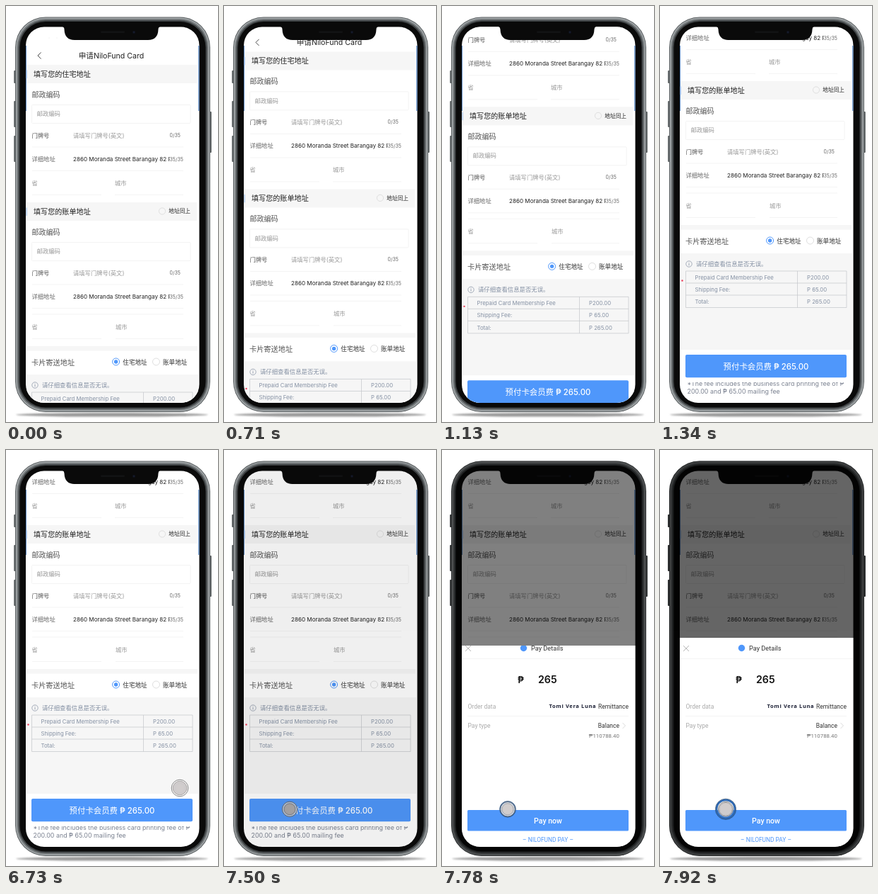
An HTML page that plays this animation: 300x587 px, repeating every 7.99 s.

```html
<!DOCTYPE html>
<html lang="zh-CN">
<head>
<meta charset="utf-8">
<style>
  html, body { margin: 0; width: 100%; height: 100%; overflow: hidden; background: #fff; }
  svg { display: block; width: 100%; height: 100%; }
  text { font-family: Inter, "Noto Sans CJK SC", "Noto Sans CJK", sans-serif; white-space: pre; }
  .roboto { font-family: Roboto, Inter, sans-serif; }
  .wide { font-family: "Open Sans", sans-serif; letter-spacing: .6px; }
</style>
</head>
<body>
<svg id="stage" viewBox="0 0 300 587"></svg>
<script>
const LOOP = 7990, STEP = 70, SCROLL = 171;
const BLUE = '#4f97fb', GREY = '#f6f6f6', LINE = '#f0f0f0', SLATE = '#8490a3';

// Text is placed by its vertical centre.
function label(x, y, size, fill, string, { anchor = 'start', weight = 400, font = '' } = {}) {
  return `<text x="${x}" y="${y + size * .37}" font-size="${size}" fill="${fill}" ` +
    `text-anchor="${anchor}" font-weight="${weight}" class="${font}">${string}</text>`;
}
const box = (x1, y1, x2, y2, fill, extra = '') =>
  `<rect x="${x1}" y="${y1}" width="${x2 - x1}" height="${y2 - y1}" fill="${fill}" ${extra}/>`;
const stroke = (d, color, width = .7) =>
  `<path d="${d}" fill="none" stroke="${color}" stroke-width="${width}"/>`;
const rule = (x1, x2, y) => stroke(`M${x1} ${y}H${x2}`, LINE);
const ring = (x, y, r, color, width = .7) =>
  `<circle cx="${x}" cy="${y}" r="${r}" fill="none" stroke="${color}" stroke-width="${width}"/>`;
const dot = (x, y, r, fill) => `<circle cx="${x}" cy="${y}" r="${r}" fill="${fill}"/>`;

// One layer of the phone's rim, inset from its outer edge.
const rim = (inset, fill) =>
  box(13 + inset, 15.5 + inset, 289 - inset, 573 - inset, fill, `rx="${43 - inset}"`);

function addressForm(top, title, cityY, cityX) {
  return box(29, top - 13, 270, top + 13, GREY) +
    box(28.5, top - 5.5, 29.8, top + 6, '#a9c8f0') +
    label(39, top, 10.1, '#222', title, { weight: 500 }) +
    label(36.5, top + 29, 10, '#555', '邮政编码') +
    box(36.5, top + 43.5, 261, top + 69.5, '#fff', `stroke="${LINE}" stroke-width=".8" rx="1"`) +
    label(43.5, top + 56, 8.4, '#999', '邮政编码') +
    label(36.5, top + 86.5, 8.3, '#555', '门牌号') +
    label(95, top + 86.5, 8.3, '#999', '请填写门牌号(英文)') +
    label(231.5, top + 86.5, 7, '#666', '0/35') +
    rule(37, 251, top + 103) +
    label(36.5, top + 120, 8.3, '#666', '详细地址') +
    `<g clip-path="url(#field)">` +
    label(95, top + 120, 8.1, '#222', '2860 Moranda Street Barangay 82 F') + `</g>` +
    label(231.5, top + 120, 7, '#666', '35/35') +
    rule(37, 251, top + 136.5) +
    label(36.5, cityY, 8.3, '#999', '省') +
    label(cityX, cityY, 8.3, '#999', '城市') +
    rule(37, 135, cityY + 16.5) + rule(cityX, 251, cityY + 16.5);
}

function feeTable() {
  const rows = [['Prepaid Card Membership Fee', 'P200.00'], ['Shipping Fee:', 'P 65.00'], ['Total:', 'P 265.00']];
  return stroke('M36.5 545H264V596.5H36.5ZM36.5 562H264M36.5 579H264M194.5 545V596.5', '#c3c6cb') +
    rows.map(([name, price], i) => {
      const y = 553.7 + i * 17.3;
      return label(49.5, y, 7.75, SLATE, name) + label(208, y, 7.75, SLATE, price);
    }).join('');
}

const page =
  dot(61, 45, .5, '#ddd') + dot(72, 45, .5, '#ddd') +
  stroke('M49.5 65.5L45 70L49.5 74.5', '#333', .9) +
  label(149, 70, 10.6, '#222', '申请NiloFund Card', { anchor: 'middle' }) +
  addressForm(96, '填写您的住宅地址', 250, 154) +
  addressForm(290, '填写您的账单地址', 453, 155) +
  rule(37, 251, 435) +
  ring(221, 289.5, 4.6, '#d4d4d4') +
  label(230.3, 289.5, 7.7, '#222', '地址同上', { weight: 500 }) +
  box(29, 480, 271, 486.5, GREY) +
  label(36, 503, 10.2, '#555', '卡片寄送地址') +
  ring(155.6, 502, 5, BLUE, 1) + dot(155.6, 502, 2.7, BLUE) +
  label(165.3, 502.5, 8.6, '#333', '住宅地址') +
  ring(212.5, 502, 5, '#d0d0d0') +
  label(222, 502.5, 8.6, '#333', '账单地址') +
  box(29, 520, 272, 656, GREY) +
  ring(41, 535, 4.2, SLATE) + stroke('M41 534V537.3M41 532.4V533.2', SLATE, .8) +
  label(51, 534.5, 8.4, SLATE, '请仔细查看信息是否无误。') +
  dot(31.5, 558.5, 1.2, '#ee3f5c') +
  feeTable() +
  label(38.5, 703.5, 8.9, '#7a8190', '*The fee includes the business card printing fee of ₱') +
  label(38.5, 714.5, 8.9, '#7a8190', '200.00 and ₱ 65.00 mailing fee') +
  box(29, 656, 272, 702, '#fff') +
  box(36, 663, 264, 695.3, BLUE, 'rx="2"') +
  label(150, 679.5, 11.4, '#fff', '预付卡会员费 ₱ 265.00', { anchor: 'middle', weight: 500 });

const roboto = { font: 'roboto' }, robotoEnd = { font: 'roboto', anchor: 'end' };
const payment =
  box(27, 265, 274.5, 562, '#fff') +
  stroke('M33 276L41 284M41 276L33 284', '#999') +
  dot(115.5, 279.5, 4.7, BLUE) +
  label(126, 279.7, 9.2, '#333', 'Pay Details', roboto) +
  rule(28, 273, 294.5) +
  label(107, 324, 13, '#111', '₱', { weight: 600 }) +
  label(136, 324, 14.2, '#111', '265', { weight: 600 }) +
  label(36.5, 361.5, 8.5, '#aaa', 'Order data', roboto) +
  label(218.3, 361, 7.6, '#1c2035', 'Tomi Vera Luna', { anchor: 'end', weight: 700, font: 'wide' }) +
  label(264, 361.5, 8.5, '#333', 'Remittance', robotoEnd) +
  rule(36, 264, 375.5) +
  label(36.5, 389, 8.5, '#aaa', 'Pay type', roboto) +
  label(251, 389, 8.5, '#333', 'Balance', robotoEnd) +
  stroke('M255.5 385L259.5 389L255.5 393', '#ccc') +
  label(251, 403, 7.9, '#777', '₱110788.40', robotoEnd) +
  box(36, 508, 264, 537.5, BLUE, 'rx="1.5"') +
  label(150, 523, 10.6, '#fff', 'Pay now', { anchor: 'middle', weight: 500, font: 'roboto' }) +
  label(150, 550, 8.4, BLUE, '– NILOFUND PAY –', { anchor: 'middle', font: 'roboto' });

const stage = document.getElementById('stage');
stage.innerHTML = `
  <defs>
    <filter id="soft" x="-5%" y="-100%" width="110%" height="300%"><feGaussianBlur stdDeviation="1.2"/></filter>
    <filter id="satin"><feGaussianBlur stdDeviation=".5"/></filter>
    <clipPath id="field"><rect x="90" y="0" width="141.5" height="720"/></clipPath>
    <clipPath id="screen"><rect x="28" y="29.5" width="245.5" height="530.5" rx="26"/></clipPath>
    <clipPath id="reveal"><rect id="revealBox" x="27" width="248" height="300"/></clipPath>
    <g id="body">
      <rect x="13" y="15.5" width="276" height="557.5" rx="43"/>
      <rect x="11.2" y="91" width="3" height="18" rx="1"/>
      <rect x="11.2" y="134" width="3" height="37" rx="1"/>
      <rect x="11.2" y="183" width="3" height="37" rx="1"/>
      <rect x="287.8" y="149" width="3" height="58" rx="1"/>
    </g>
  </defs>
  <ellipse cx="150" cy="576.8" rx="136" ry="2.8" fill="#999" filter="url(#soft)"/>
  <use href="#body" fill="#5c6163"/>
  <g filter="url(#satin)">
    ${rim(1, '#a6abad')}${rim(2.5, '#74797b')}${rim(4.5, '#404446')}${rim(6.5, '#0a0a0a')}
  </g>
  <g clip-path="url(#screen)">
    ${box(27, 29, 275, 561, '#fff')}
    ${box(27, 56, 28.8, 148, '#3f74b8')}${box(272.3, 56, 274.5, 148, '#3f74b8')}
    <g id="page">${page}</g>
  </g>
  <path d="M78 28.5Q82.5 29 82.5 33Q83 48 97 48H201Q215 48 215.5 33Q215.5 29 220 28.5Z" fill="#0a0a0a"/>
  ${box(134, 35.5, 168, 38, '#121314', 'rx="1.2"')}${dot(181, 37, 2, '#10141f')}${dot(181, 37, .7, '#222c44')}
  <use id="shade" href="#body" fill="#000"/>
  <g clip-path="url(#screen)"><g clip-path="url(#reveal)">${payment}</g></g>
  <g id="cursor">
    <circle id="ripple" fill="none" stroke="#2d68b3" stroke-width="2.8"/>
    <circle id="rippleEdge" fill="none" stroke="#27425f" stroke-width=".6"/>
    <circle id="halo" fill="#fff" fill-opacity=".75" stroke="#777" stroke-width=".9"/>
    <circle id="tip" fill="#cfcaca" fill-opacity=".95" stroke="#8d8888" stroke-width=".7"/>
  </g>`;

const part = id => document.getElementById(id);
const progress = (t, from, to) => Math.min(1, Math.max(0, (t - from) / (to - from)));
const smooth = p => p * p * (3 - 2 * p);
const mix = (a, b, p) => a + (b - a) * p;

function draw(t) {
  const scroll = SCROLL * smooth(progress(t, 430, 1340) ** 1.345);
  part('page').setAttribute('transform', `translate(0 ${-scroll})`);

  part('shade').setAttribute('opacity', .6 * smooth(progress(t, 7400, 7920)));
  const opened = 1 - (1 - progress(t, 7500, 7920)) ** 3;
  part('revealBox').setAttribute('y', mix(560, 265, opened));

  const move = smooth(progress(t, 6730, 7430));
  const press = progress(t, 7360, 7570), release = progress(t, 7640, 7920);
  const darkness = .22 * progress(t, 7360, 7500) * (1 - progress(t, 7500, 7640));
  part('cursor').setAttribute('visibility', t < 6730 ? 'hidden' : 'visible');
  part('cursor').setAttribute('transform', `translate(${mix(246, 93, move)} ${mix(477, 506.8, move)})`);
  part('cursor').style.filter = `brightness(${1 - darkness})`;
  part('halo').setAttribute('r', mix(mix(11.8, 10, press), 10.5, release));
  part('tip').setAttribute('r', mix(mix(9.8, 7, press), 9.3, release));
  part('ripple').setAttribute('r', mix(7, 13, release));
  part('rippleEdge').setAttribute('r', mix(8, 14.7, release));
}

function frame(now) {
  const t = now % LOOP;
  draw(t < 500 ? 0 : 500 + STEP * Math.floor((t - 500) / STEP));
  requestAnimationFrame(frame);
}
draw(0);
requestAnimationFrame(frame);
</script>
</body>
</html>
```
